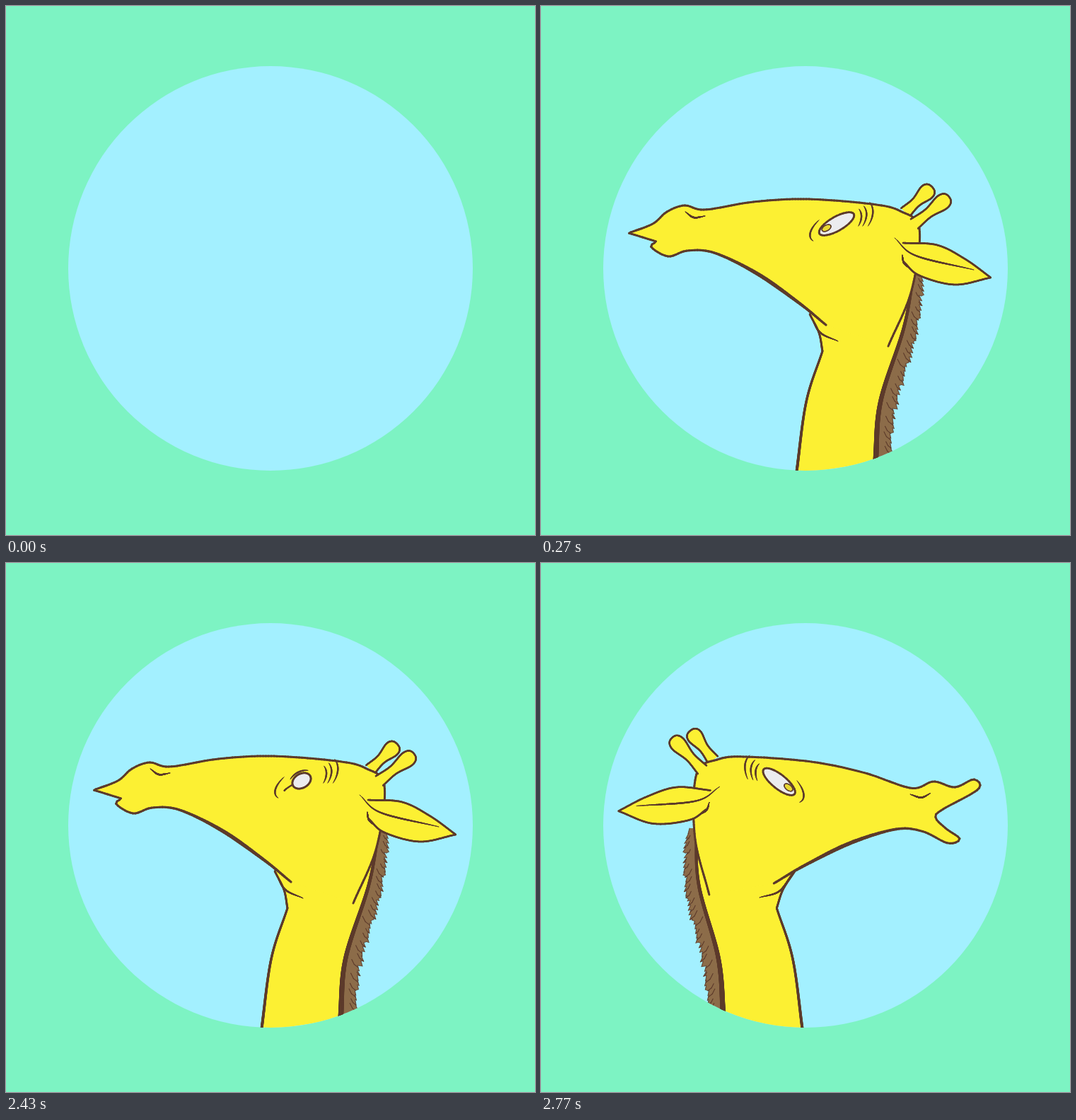
Animation, 748 px wide and 748 px high, one loop 3770 ms. Source, as an HTML page with a canvas:

```html
<!DOCTYPE html>
<html lang="en">
<head>
<meta charset="utf-8">
<title>Giraffe</title>
<style>
html, body { margin: 0; width: 100%; height: 100%; overflow: hidden; background: #7df3c3; }
canvas { display: block; width: 100vw; height: 100vh; }
</style>
</head>
<body>
<canvas id="stage" width="748" height="748"></canvas>
<script>
const ctx = document.getElementById('stage').getContext('2d');
const INK = '#5c3a2a', YELLOW = '#fcf033', BROWN = '#8c6c49', WHITE = '#ececee';
const LOOP = 3770, FRAME = 30, SAMPLES = 240, FULL = Math.PI * 2;

const lerp = (a, b, k) => a + (b - a) * k;
const clamp = v => Math.min(1, Math.max(0, v));
const between = (p, q, k) => [lerp(p[0], q[0], k), lerp(p[1], q[1], k)];
const spin = ([x, y], a) => [x * Math.cos(a) - y * Math.sin(a), x * Math.sin(a) + y * Math.cos(a)];
const noise = i => Math.abs(Math.sin(i * 12.9898) * 43758.5453) % 1;

// Key points of a line; "!" marks a sharp corner.
const knots = text => text.split(' ').map(k => ({ p: k.replace('!', '').split(',').map(Number), sharp: k.endsWith('!') }));
const move = (list, fn) => list.map(k => ({ ...k, p: fn(k.p) }));

// Smooth curve through the knots, resampled to evenly spaced points.
function curve(list) {
  const tangent = (i, from, to) => {
    const a = list[i].sharp || !list[i - 1] ? from : i - 1;
    const b = list[i].sharp || !list[i + 1] ? to : i + 1;
    return [0, 1].map(d => (list[b].p[d] - list[a].p[d]) / (b - a));
  };
  const fine = [], run = [0];
  for (let i = 0; i < list.length - 1; i++) {
    const m = tangent(i, i, i + 1), n = tangent(i + 1, i, i + 1);
    for (let s = i ? 1 : 0; s <= 24; s++) {
      const t = s / 24, u = 1 - t;
      fine.push([0, 1].map(d => list[i].p[d] * (1 + 2 * t) * u * u + m[d] * t * u * u +
        list[i + 1].p[d] * t * t * (3 - 2 * t) - n[d] * t * t * u));
    }
  }
  for (let i = 1; i < fine.length; i++)
    run[i] = run[i - 1] + Math.hypot(fine[i][0] - fine[i - 1][0], fine[i][1] - fine[i - 1][1]);
  let j = 1;
  return Array.from({ length: SAMPLES + 1 }, (_, i) => {
    const at = run[run.length - 1] * i / SAMPLES;
    while (j < run.length - 1 && run[j] < at) j++;
    return between(fine[j - 1], fine[j], (at - run[j - 1]) / (run[j] - run[j - 1] || 1));
  });
}

// Club shape of a horn: slim stem, round end.
function horn([base, tip]) {
  const dx = tip.p[0] - base.p[0], dy = tip.p[1] - base.p[1], length = Math.hypot(dx, dy);
  const half = [[0, .7], [.4, .55], [.8, .9], [.98, .5]];
  const sides = [...half.map(([t, w]) => [t, -w]), ...half.reverse()];
  return sides.map(([t, w]) => ({ p: [
    base.p[0] + dx * t - dy / length * w * 12,
    base.p[1] + dy * t + dx / length * w * 12
  ] }));
}

// All poses face left; a pose facing right is drawn flipped.
const leftLines = {
  front: '380,436 393,462 398,488! 375,560 361,662',
  back: '528,375 513,455 480,560 473,645',
  jaw: '403,451! 365,420 305,378 245,349 207,346',
  muzzle: '180,354 156,341 163,333! 124,321! 158,308 178,291 203,282',
  crown: '232,288 300,277 375,273 467,280 508,290 535,315 524,402 491,481',
  ear: '512,335 560,338 600,358 636,384! 585,394 535,381 513,362',
  far: '515,292 553,256',
  near: '528,308 577,270',
  nose: '204,291 216,299 232,297',
  throat: '380,434 394,461 420,474',
  fold: '500,328 530,353 612,373',
  nick: '511,352 513,363 521,371'
};
const upLines = {
  front: '390,460 391,490 375,570 355,662',
  back: '510,495 486,532 472,595 468,645',
  jaw: '400,473! 381,437 378,350 393,250 413,175',
  muzzle: '411,132 433,118 445,132 437,172! 452,133 463,127 461,155 454,185',
  crown: '470,225 512,290 545,328 566,372 562,415 540,458 510,495',
  ear: '551,433 485,455 452,525 446,580! 475,540 527,478',
  far: '566,400 582,318',
  near: '563,418 587,316',
  nose: '457,140 456,155 448,163',
  throat: '391,459 395,468 400,473',
  fold: '518,458 514,474 506,490',
  nick: '427,165 432,186 439,168'
};
const downLines = {
  front: '388,488 382,536 364,610 361,662',
  back: '512,383 505,450 485,540 476,645',
  jaw: '424,445! 410,465 360,482 325,510 315,527',
  muzzle: '301,555 299,574 289,574 284,559! 265,573 245,565 260,548 259,527',
  crown: '280,480 310,395 350,328 380,291 440,268 480,276 497,322 509,400 488,474',
  ear: '473,289 500,323 555,357 577,410! 545,395 485,360 461,312',
  far: '471,272 475,243',
  near: '479,281 511,243',
  nose: '268,530 272,512 272,527',
  throat: '386,474 397,493 416,482',
  fold: '500,320 519,346 512,365',
  nick: '505,377 500,396 490,415'
};

const NECK = ['front', 'back'], CREASES = ['nose', 'throat', 'fold', 'nick'];

const parse = lines => Object.fromEntries(Object.entries(lines).map(([name, text]) => [name, knots(text)]));

function pose(lines, eye, turn) {
  const { jaw, muzzle, crown, far, near, ...rest } = lines;
  const outlines = { ...rest, head: [...jaw, ...muzzle, ...crown], far: horn(far), near: horn(near) };
  const parts = Object.fromEntries(Object.entries(outlines).map(([name, list]) => [name, curve(list)]));
  return { parts, eye, turn };
}

// The call: the calm pose with the head tipped back, the neck leaning and the mouth open.
function calling(lines, eye) {
  const TIP = -.155;
  const tip = ([x, y]) => {
    const [dx, dy] = spin([x - 427, y - 300], TIP);
    return [418 + dx, 300 + dy];
  };
  const lean = ([x, y]) => [x + 16 * clamp((y - 380) / 110), y];
  const out = {};
  for (const name in lines) out[name] = move(lines[name], NECK.includes(name) ? lean : tip);
  out.muzzle = knots('172,396 155,390 175,375 189,360 180,349 129,320 135,306 162,317 192,309');
  const [x, y] = tip([eye.x, eye.y]);
  return pose(out, { ...eye, x, y, tilt: eye.tilt + TIP }, TIP);
}

// The head turns about the eye while its shape blends; the neck only blends.
function mix(a, b, k) {
  const turn = lerp(a.turn, b.turn, k), eye = {}, parts = {};
  for (const key in a.eye) eye[key] = lerp(a.eye[key], b.eye[key], k);
  const local = (p, q) => spin([p[0] - q.eye.x, p[1] - q.eye.y], -q.turn);
  for (const name in a.parts) parts[name] = a.parts[name].map((p, i) => {
    const q = b.parts[name][i];
    if (NECK.includes(name)) return between(p, q, k);
    const [x, y] = spin(between(local(p, a), local(q, b), k), turn);
    return [x + eye.x, y + eye.y];
  });
  return { parts, eye, turn };
}

const calm = parse(leftLines);
const calmEye = { x: 418, y: 308, rx: 28, ry: 10, tilt: -.52, pupil: -.55 };
const level = pose(calm, calmEye, 0);
const call = calling(calm, calmEye);
const up = pose(parse(upLines), { x: 498, y: 334, rx: 29, ry: 13, tilt: .05, pupil: -.6 }, 1.31);
const down = pose(parse(downLines), { x: 382, y: 344, rx: 37, ry: 9.5, tilt: -1.5, pupil: .62 }, -.98);

const linear = t => t, smooth = t => t * t * (3 - 2 * t), settle = t => 1 - (1 - t) ** 3;
const moves = [
  { start: 30, end: 90, from: call, to: down, ease: linear, flip: true },
  { start: 120, end: 270, from: up, to: level, ease: settle },
  { start: 2560, end: 2650, from: level, to: down, ease: smooth },
  { start: 2680, end: 2770, from: up, to: call, ease: settle, flip: true }
];

function lidsAt(time) {
  const since = Math.min(...[1270, 2430].map(t => time < t ? Infinity : time - t));
  if (since >= 160) return 1;
  return since >= 30 && since < 130 ? 0 : .5;
}

function fill(points, color) {
  ctx.beginPath();
  points.forEach(p => ctx.lineTo(...p));
  ctx.closePath();
  ctx.fillStyle = color;
  ctx.fill();
}

function ink(points, width) {
  ctx.strokeStyle = INK;
  for (let i = 1; i < points.length; i++) {
    ctx.lineWidth = typeof width === 'function' ? width(i / points.length) : width;
    ctx.beginPath();
    ctx.moveTo(...points[i - 1]);
    ctx.lineTo(...points[i]);
    ctx.stroke();
  }
}

function shape(points, color, width) {
  fill(points, color);
  ink(points, width);
}

const taper = t => .8 + 1.6 * Math.sin(Math.PI * t);

function drawMane(back) {
  const hair = back.map(([x, y], i) => {
    const t = i / SAMPLES, tooth = i % 6 / 5, tuft = i % 29 / 28;
    const width = 11 + 10 * Math.sin(Math.PI * t * .75);
    return [x + width + tooth * (1 + 3 * noise(i - i % 6)) + tuft * 4 - 2, y + tooth * 2];
  });
  fill([...back, ...hair.slice().reverse()], BROWN);
  ink(hair, .8);
  for (let i = 14; i < SAMPLES; i += 9) {
    const [x, y] = hair[i], reach = 5 + noise(i) * 8;
    ink([[x, y], [x - reach * .5, y - reach * .4], [x - reach * .8, y - reach]], 1.1);
  }
}

function drawEye(eye, lids) {
  const { x, y, rx, ry, tilt, pupil } = eye;
  const arc = (w, h, from = 0, to = FULL, cx = 0, cy = 0) => Array.from({ length: 33 }, (_, i) => {
    const a = lerp(from, to, i / 32);
    const [dx, dy] = spin([cx + w * Math.cos(a), cy + h * Math.sin(a)], tilt);
    return [x + dx, y + dy];
  });
  ink(arc(rx + 14, ry + 9, 2.9, 4.25), taper);
  [10, 18, 28].forEach(gap => ink(arc(rx + gap, ry + 9 + gap / 2, -.1, .85), taper));
  if (lids) shape(arc(rx * lids, ry), WHITE, 2.8);
  if (lids === 1) shape(arc(7, 4, 0, FULL, rx * pupil, -ry * .2), '#e8d832', 1.4);
  if (lids < 1) {
    ink(arc(rx, 2, Math.PI, lids ? 4.2 : FULL), 2);
    ink(arc(rx * .7, ry + 3, 4, 5.6), taper);
  }
}

function drawGiraffe({ parts, eye }, lids) {
  drawMane(parts.back);
  fill([...parts.front, ...parts.back.slice().reverse()], YELLOW);
  ink(parts.back, t => 3.5 + 4 * t);
  ink(parts.front, t => 2.6 + 1.4 * t);
  shape(parts.far, YELLOW, 2.4);
  shape(parts.head, YELLOW, t => 3 + 2.4 * Math.exp(-(((t - .11) / .07) ** 2)));
  shape(parts.near, YELLOW, 2.4);
  shape(parts.ear, YELLOW, 2.6);
  CREASES.forEach(name => ink(parts[name], taper));
  drawEye(eye, lids);
}

function draw(time) {
  ctx.fillStyle = '#7df3c3';
  ctx.fillRect(0, 0, 748, 748);
  ctx.save();
  ctx.beginPath();
  ctx.arc(374, 371, 286, 0, FULL);
  ctx.fillStyle = '#a3f0ff';
  ctx.fill();
  ctx.clip();
  const current = moves.filter(m => m.start <= time).pop();
  if (current) {
    const { start, end, from, to, ease, flip } = current;
    const k = Math.floor((time - start) / FRAME) * FRAME / (end - start);
    if (flip) ctx.transform(-1, 0, 0, 1, 747, 0);
    drawGiraffe(mix(from, to, ease(clamp(k))), lidsAt(time));
  }
  ctx.restore();
}

ctx.lineCap = ctx.lineJoin = 'round';
const begin = performance.now();

function tick() {
  draw(Math.max(0, performance.now() - begin) % LOOP);
  requestAnimationFrame(tick);
}
tick();
</script>
</body>
</html>
```
